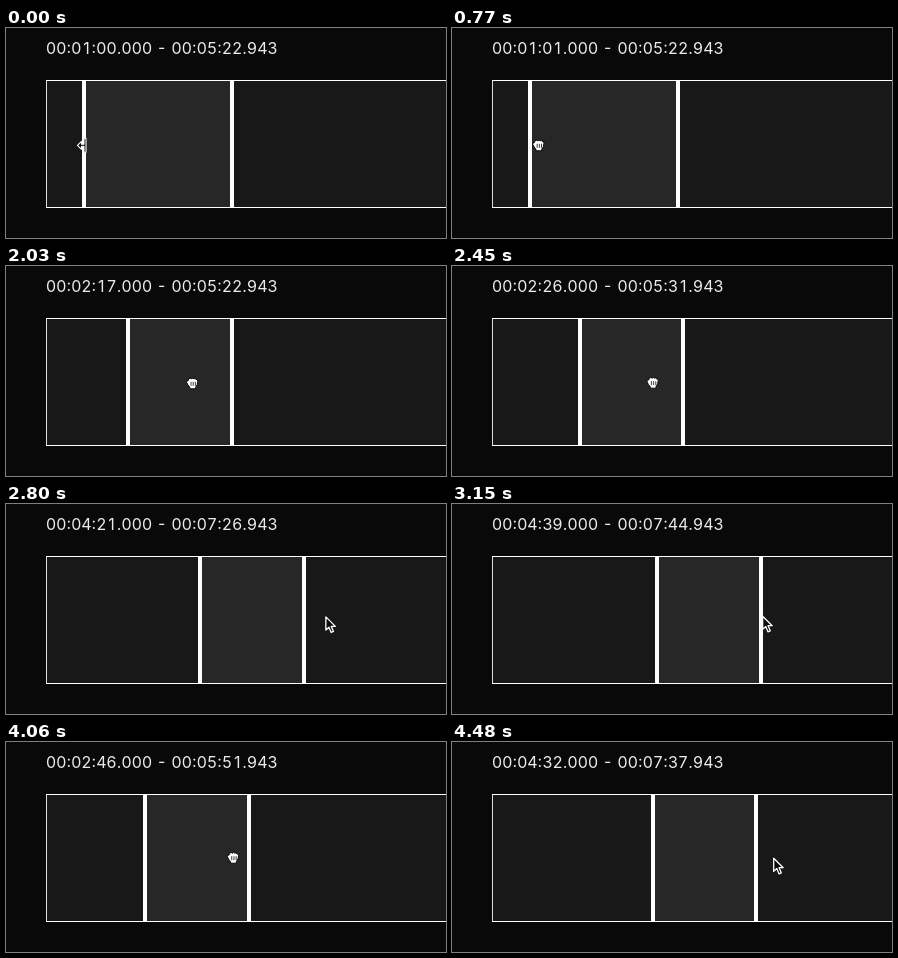
These frames come from a looping animation (440 px wide and 210 px high, 4.55 s). An HTML page with a canvas:

```html
<!DOCTYPE html>
<html lang="en">
<head>
<meta charset="utf-8">
<title>Range slider</title>
<style>
  html, body { margin: 0; width: 100%; height: 100%; overflow: hidden; background: #090909; }
  canvas { display: block; }
</style>
</head>
<body>
<canvas id="stage" width="440" height="210"></canvas>
<script>
const ctx = document.getElementById('stage').getContext('2d');
const LOOP = 4550, STEP = 70;
const TRACK = { x: 40, y: 52, h: 128 };
const SCALE = 0.5797;   // pixels per second of range
const HANDLE = 4;
const RANGE_DRAG = 2200;  // from here on the whole range is dragged
const END = 322.943, TRIMMED_START = 137;

// A path is a rest value followed by eased moves: begin ms, finish ms, new value.
const rangeStart = path(60, [700, 1487, 137], [2353, 2987, 292], [2987, 3848, 140], [3880, 4490, 272]);
const pointerX = path(76, [0, 280, 78], [580, 1481, 155], [1680, 2030, 186],
  [2330, 2926, 335], [2926, 3756, 187], [3840, 4440, 321]);
const pointerY = path(117.3, [2330, 2926, 111], [3150, 3640, 116], [3840, 4440, 115]);

function path(rest, ...moves) {
  return t => moves.reduce((value, [begin, finish, to]) => {
    const u = Math.min(1, Math.max(0, (t - begin) / (finish - begin)));
    return value + (to - value) * (1 - Math.cos(Math.PI * u)) / 2;
  }, rest);
}

function clock(seconds) {
  const ms = Math.round(seconds * 1000);
  const pad = (n, size) => String(n).padStart(size, '0');
  const part = (unit, mod) => pad(Math.floor(ms / unit) % mod, 2);
  return `${part(3600000, 100)}:${part(60000, 60)}:${part(1000, 60)}.${pad(ms % 1000, 3)}`;
}

// Tabular layout: digits and hyphen share a cell width; colon and hyphen sit at digit height.
function drawLabel(text) {
  ctx.font = '16px Inter, Roboto, sans-serif';
  ctx.fillStyle = '#ebebeb';
  ctx.textAlign = 'center';
  const cell = ctx.measureText('0').width;
  let x = 40;
  for (const ch of text) {
    const w = /[\d-]/.test(ch) ? cell : ctx.measureText(ch).width;
    ctx.fillText(ch, x + w / 2, /[:-]/.test(ch) ? 25 : 26);
    x += w + 0.12;
  }
}

function rect(color, x, y, w, h) {
  ctx.fillStyle = color;
  ctx.fillRect(x, y, w, h);
}

function shape(d, fill, stroke, width) {
  const outline = new Path2D(d);
  ctx.lineJoin = 'round';
  ctx.lineWidth = width;
  ctx.strokeStyle = stroke;
  ctx.fillStyle = fill;
  ctx.fill(outline);
  ctx.stroke(outline);
}

const pointers = {
  arrow() {
    shape('M.7 1.2V14.4L3.8 11.5 6 16.8 8.3 15.8 6.1 10.7H10.2Z', '#0a0a0a', '#fff', 1.3);
  },
  resize() {
    shape('M-4.5 0L-.5 -4V-1H2V-7H4V7H2V1H-.5V4Z', '#050505', '#fff', 1.1);
  },
  hand() {
    shape('M-5.4 -1Q-5.4 -3 -3.6 -2.8Q-3.8 -5 -2 -5Q-.8 -5.2 -.3 -4.5Q.8 -5.8 2 -4.6' +
      'Q3.3 -5.2 4 -4Q6 -4 5.8 -2Q5.8 1.5 3.6 4V5.5H-2.2V4Q-4.2 2 -5.4 -1Z', '#fff', '#080808', 1);
    ctx.lineWidth = 0.8;
    ctx.stroke(new Path2D('M-1 -1.5V2.5M1.2 -1.5V2.5M3.4 -1.5V2.5'));
  }
};

function drawPointer(x, y, left, right) {
  const outside = x < left - 3 || x >= right - 1.5;
  const onLeft = x < left + HANDLE + 1;
  const onRight = !outside && x > right - HANDLE - 1;
  ctx.save();
  ctx.translate(x, y);
  if (onRight) ctx.scale(-1, 1);
  pointers[outside ? 'arrow' : onLeft || onRight ? 'resize' : 'hand']();
  ctx.restore();
}

function draw(time) {
  const t = Math.floor((time % LOOP) / STEP) * STEP;
  const start = Math.round(rangeStart(t));
  const end = END + (t < RANGE_DRAG ? 0 : start - TRIMMED_START);
  const toX = s => Math.round(TRACK.x + 1 + s * SCALE);
  const left = toX(start), right = toX(end);
  const top = TRACK.y + 1, height = TRACK.h - 2;

  rect('#090909', 0, 0, 440, 210);
  drawLabel(`${clock(start)} - ${clock(end)}`);
  rect('#fff', TRACK.x, TRACK.y, 400, TRACK.h);
  rect('#dcdcdc', TRACK.x, top, 1, height);
  rect('#181818', TRACK.x + 1, top, 399, height);
  rect('#272727', left, top, right - left, height);
  rect('#fff', left, top, HANDLE, height);
  rect('#fff', right - HANDLE, top, HANDLE, height);
  drawPointer(pointerX(t), pointerY(t), left, right);
}

const origin = performance.now();
function tick() {
  draw(performance.now() - origin);
  requestAnimationFrame(tick);
}
tick();
</script>
</body>
</html>
```
